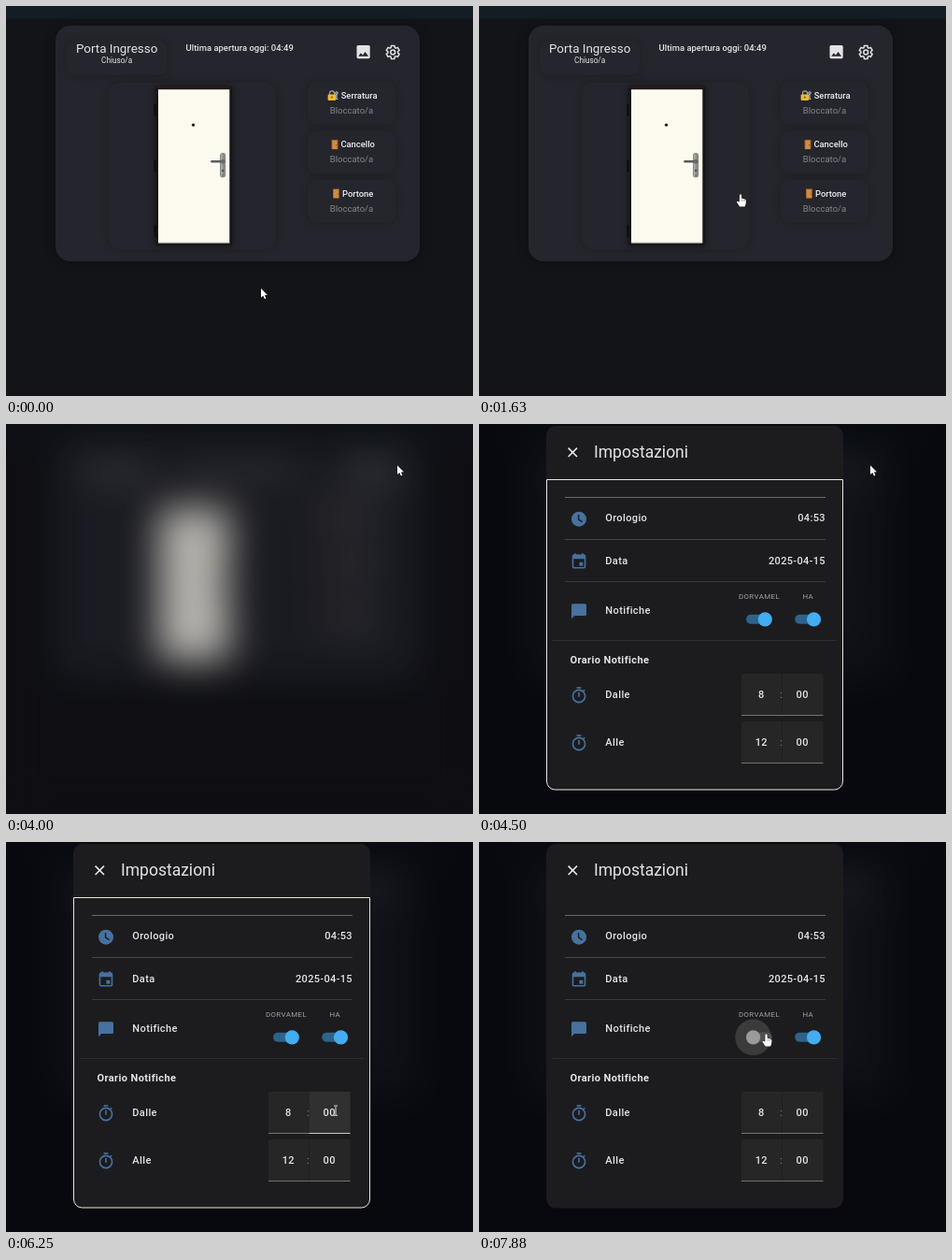
An HTML page with a canvas for the animation above (8 s loop, 500 px wide and 417 px high).

```html
<!DOCTYPE html>
<html lang="it">
<head>
<meta charset="utf-8">
<title>Porta Ingresso</title>
<style>
html, body { margin: 0; width: 100%; height: 100%; overflow: hidden; background: #131418; }
canvas { display: block; width: 500px; height: 417px; }
</style>
</head>
<body>
<canvas id="stage"></canvas>
<script>
const W = 500, H = 417, LOOP = 8000, STEP = 125, CLICK = 7500;
const dpr = window.devicePixelRatio || 1;
const FONT = 'Roboto, "Open Sans", sans-serif';
const BLUE = '#47719f';

function sized(canvas) {
  canvas.width = W * dpr;
  canvas.height = H * dpr;
  const c = canvas.getContext('2d');
  c.scale(dpr, dpr);
  return c;
}
const ctx = sized(document.getElementById('stage'));
const room = document.createElement('canvas');
let g = sized(room);

const clamp = v => Math.min(1, Math.max(0, v));
const ramp = (t, a, b) => clamp((t - a) / (b - a));
const ease = p => p * p * (3 - 2 * p);
const mix = (a, b, p) => a + (b - a) * p;

// ---- drawing helpers ----
function box(x, y, w, h, r, fill) {
  g.beginPath();
  g.roundRect(x, y, w, h, r);
  g.fillStyle = fill;
  g.fill();
}
function disc(x, y, r, fill) {
  g.beginPath();
  g.arc(x, y, r, 0, 7);
  g.fillStyle = fill;
  g.fill();
}
function ring(x, y, r, color, width) {
  g.beginPath();
  g.arc(x, y, r, 0, 7);
  g.strokeStyle = color;
  g.lineWidth = width;
  g.stroke();
}
function line(color, width, ...p) {
  g.beginPath();
  for (let i = 0; i < p.length; i += 2) g.lineTo(p[i], p[i + 1]);
  g.strokeStyle = color;
  g.lineWidth = width;
  g.stroke();
}
function poly(fill, ...p) {
  g.beginPath();
  for (let i = 0; i < p.length; i += 2) g.lineTo(p[i], p[i + 1]);
  g.closePath();
  g.fillStyle = fill;
  g.fill();
}
function text(s, x, y, size, { color = '#e4e4e6', weight = 400, align = 'center', space = 0 } = {}) {
  g.font = `${weight} ${size}px ${FONT}`;
  g.letterSpacing = space + 'px';
  g.textAlign = align;
  g.fillStyle = color;
  g.fillText(s, x, y);
}
function shadowBox(x, y, w, h, r, fill, shade, blur) {
  g.save();
  g.shadowColor = shade;
  g.shadowBlur = blur * dpr;
  box(x, y, w, h, r, fill);
  g.restore();
}

// ---- door panel ----
function drawDoor() {
  shadowBox(160, 86, 82, 170, 1, '#17171a', 'rgba(0,0,0,.55)', 6);
  box(161, 86, 79, 2, 0, '#2a1719');
  for (const y of [105, 165, 234]) box(158.5, y, 2.5, 13, 1, '#0d0d0f');
  box(163, 89.3, 76.3, 164, 0, '#fcf9ee');
  box(163, 252.5, 76.3, 1, 0, '#cfccc2');
  disc(200.5, 127.2, 1.6, '#1b1a18');
  box(229, 157, 6.2, 26.5, 3, '#8a8a89');
  box(230, 158, 1.6, 24, 1, '#a9a9a7');
  box(219.2, 165, 14, 2.5, 1.2, '#5d5d5c');
  disc(232.2, 166.3, 2.4, '#686867');
  disc(232.2, 176, 1.2, '#4a4a49');
  disc(232.2, 181, .8, '#5a5a59');
}
function drawImageIcon() {
  box(375.5, 42, 14.2, 14.2, 1.6, '#e3e3e6');
  poly('#25262d', 377.2, 53.8, 379.9, 50.3, 381.9, 52.6, 384.6, 49, 388.1, 53.8);
}
function drawGear() {
  g.beginPath();
  for (let k = 0; k < 6; k++) {
    const a = (k / 6 - .25) * Math.PI * 2;
    for (const [d, r] of [[-.4, 5.3], [-.25, 7.2], [.25, 7.2], [.4, 5.3]])
      g.lineTo(414.2 + r * Math.cos(a + d), 49.4 + r * Math.sin(a + d));
  }
  g.closePath();
  g.lineJoin = 'round';
  g.strokeStyle = '#e3e3e6';
  g.lineWidth = 1.5;
  g.stroke();
  g.lineJoin = 'miter';
  ring(414.2, 49.4, 2.4, '#e3e3e6', 1.5);
}
function drawLock() {
  g.beginPath();
  g.arc(349, 93.4, 2.5, Math.PI, 0);
  g.lineTo(351.5, 96);
  g.moveTo(346.5, 93.4);
  g.lineTo(346.5, 96);
  g.strokeStyle = '#a9a394';
  g.lineWidth = 1.2;
  g.stroke();
  box(344.6, 94.6, 8.6, 6.4, 1.2, '#f0b92f');
  disc(348.8, 97.4, 1, '#7a5a18');
  ring(353.9, 93, 1.3, '#c3cbd2', 1);
  line('#c3cbd2', 1.1, 353.9, 94, 353.9, 99.5, 355.4, 99.5);
}
function drawDoorIcon(x, y) {
  box(x, y, 6.8, 10.2, .6, '#a8652a');
  box(x + .9, y + .9, 5, 9, .3, '#d08c42');
  disc(x + 5, y + 5.6, .6, '#7a4a1c');
}
function drawPanel() {
  box(0, 0, W, H, 0, '#131418');
  box(0, 0, W, 13.5, 0, '#121e24');
  shadowBox(53, 21, 390, 252, 16, '#25262d', 'rgba(0,0,0,.35)', 12);
  const tile = (x, y, w, h, r) => shadowBox(x, y, w, h, r, '#25262d', 'rgba(0,0,0,.22)', 8);
  tile(65, 37, 107, 37, 9);
  tile(110, 82, 179, 178, 12);
  for (const y of [81, 133.4, 185.8]) tile(323, y, 94, 46, 10);

  text('Porta Ingresso', 118.6, 50, 13.4);
  text('Chiuso/a', 118.6, 61, 8.2);
  text('Ultima apertura oggi: 04:49', 250.2, 48.3, 9.45, { weight: 500 });
  drawImageIcon();
  drawGear();

  const label = { weight: 500, align: 'left', color: '#ededf0' };
  text('Serratura', 358.7, 99, 9.4, label);
  text('Cancello', 358.4, 151.4, 9.4, label);
  text('Portone', 360, 203.8, 9.4, label);
  for (const y of [115, 167.4, 219.8]) text('Bloccato/a', 370, y, 9.5, { color: '#85868c' });
  drawLock();
  drawDoorIcon(348.6, 143);
  drawDoorIcon(350, 195.4);
  drawDoor();
}

// ---- settings dialog ----
function drawClock(x, y) {
  disc(x, y, 8, BLUE);
  line('#1c1c1e', 1.4, x - .4, y - 4.6, x - .4, y + .5, x + 3.6, y + 2.9);
}
function drawCalendar(x, y) {
  g.strokeStyle = BLUE;
  g.lineWidth = 1.6;
  g.beginPath();
  g.roundRect(x - 6.5, y - 6.2, 13, 13.4, 1);
  g.stroke();
  box(x - 7, y - 6.8, 14, 4.4, 1, BLUE);
  box(x - 4.8, y - 8.4, 1.7, 3, 0, BLUE);
  box(x + 3.1, y - 8.4, 1.7, 3, 0, BLUE);
  box(x + .4, y + 1.2, 3.9, 3.9, 0, BLUE);
}
function drawMessage(x, y) {
  box(x - 8, y - 8, 16, 12.8, 1.6, BLUE);
  poly(BLUE, x - 8, y, x - 8, y + 8, x - 4, y + 4);
}
function drawTimer(x, y) {
  ring(x, y + 1, 6.6, BLUE, 1.6);
  box(x - 2.4, y - 8.8, 4.8, 1.6, 0, BLUE);
  box(x - .8, y - 3.2, 1.6, 5, 0, BLUE);
  line(BLUE, 1.6, x + 4.6, y - 4.2, x + 6.2, y - 5.8);
}
function drawSwitch(x, y, on, halo) {
  const shade = on > .5;
  box(x, y - 5, 27.5, 10, 5, shade ? '#2e638b' : '#49494b');
  const tx = mix(x + 7.6, x + 20.3, on);
  if (halo > 0) disc(tx, y, 19.3, shade ? `rgba(68,172,240,${.13 * halo})` : `rgba(160,160,160,${.23 * halo})`);
  if (!shade) box(tx, y - 5, x + 27.5 - tx, 10, 5, '#515153');
  disc(tx, y, 7.6, shade ? '#44acf0' : '#9b9b9b');
}
function drawTime(y, hour, cur) {
  const over = inside(cur, 281, y, 87, 44);
  box(281, y, 87.5, 44, [2, 2, 0, 0], '#262627');
  box(324, y, .8, 44, 0, '#1f1f20');
  line('#737375', 1, 281, y + 44.5, 368.5, y + 44.5);
  if (over) {
    const x = cur.x < 324 ? 281 : 324.5;
    box(x, y, 44, 44, 0, '#303031');
    line('#c9c9cb', 1, x, y + 44.5, x + 44, y + 44.5);
  }
  text(hour, 302.3, y + 26.4, 11, { weight: 500, space: .4 });
  text(':', 323.5, y + 26.4, 11, { color: '#8d8d8f' });
  text('00', 346.2, y + 26.4, 11, { weight: 500, space: .4 });
}
function drawDialog(t, cur) {
  box(72, 2, 318, 389.5, 10, '#1c1c1e');
  line('#eeeeee', 1.5, 95.6, 25.6, 105, 35);
  line('#eeeeee', 1.5, 105, 25.6, 95.6, 35);
  text('Impostazioni', 123, 36.4, 17.5, { align: 'left' });

  line('#68686a', 1, 92, 78.5, 371, 78.5);
  line('#454547', 1, 92, 123.5, 371, 123.5);
  line('#39393b', 1, 92, 168.5, 371, 168.5);
  line('#2e2e30', 1, 79, 231.5, 383, 231.5);

  const row = { weight: 500, align: 'left', space: .38 };
  text('Orologio', 135.3, 104, 11, row);
  text('Data', 135.3, 149.7, 11, row);
  text('Notifiche', 135.3, 203.4, 11, row);
  text('Orario Notifiche', 97.6, 256, 11, { ...row, weight: 600 });
  text('Dalle', 135.3, 293, 11, row);
  text('Alle', 135.3, 344, 11, row);
  text('04:53', 371, 104, 11, { ...row, align: 'right' });
  text('2025-04-15', 371, 149.7, 11, { ...row, align: 'right' });
  const tag = { color: '#a3a3a5', space: .4 };
  text('DORVAMEL', 300, 187, 7.9, tag);
  text('HA', 352.3, 187, 7.9, tag);

  drawClock(107, 101.7);
  drawCalendar(107, 146.6);
  drawMessage(107, 200.3);
  drawTimer(107, 290);
  drawTimer(107, 341);

  drawTime(267, '8', cur);
  drawTime(318, '12', cur);

  drawSwitch(338.2, 208.8, 1, 0);
  const halo = inside(cur, 280, 198, 40, 22) ? 1 : 0;
  drawSwitch(286, 208.8, 1 - ramp(t, CLICK, CLICK + 110), halo);

  if (t < CLICK) {
    g.beginPath();
    g.roundRect(72.5, 59.5, 317, 331.5, [0, 0, 9, 9]);
    g.strokeStyle = '#e8e6e0';
    g.lineWidth = 1;
    g.stroke();
  }
}

// ---- pointer ----
const path = [
  [0, 273, 302], [750, 274, 301], [1000, 274, 301], [1625, 280, 201.5],
  [2000, 280, 201.5], [3000, 399.5, 43.5], [3625, 419, 44.3], [4500, 419, 44.3],
  [5375, 340, 165], [6250, 353, 287], [7250, 307.5, 205.5], [LOOP, 307.5, 205.5]
];
function inside(p, x, y, w, h) {
  return p.x >= x && p.x < x + w && p.y >= y && p.y < y + h;
}
function pointerAt(t) {
  const i = path.findIndex(p => p[0] > t);
  const a = path[i - 1], b = path[i];
  const p = ease(ramp(t, a[0], b[0]));
  return { x: mix(a[1], b[1], p), y: mix(a[2], b[2], p) };
}
function drawArrow() {
  g.beginPath();
  for (const [x, y] of [[0, 0], [0, 9.8], [2.3, 7.8], [3.9, 11.2], [5.4, 10.5], [3.9, 7.2], [6.9, 7]]) g.lineTo(x, y);
  g.closePath();
  g.fillStyle = '#ffffff';
  g.strokeStyle = '#0a0a0a';
  g.lineWidth = .9;
  g.stroke();
  g.fill();
}
function drawHand() {
  g.beginPath();
  g.moveTo(-1.1, .4);
  g.quadraticCurveTo(0, -.8, 1.1, .4);
  g.lineTo(1.3, 4.2);
  g.quadraticCurveTo(5.8, 4.6, 6, 6.4);
  g.lineTo(5.6, 10.2);
  g.lineTo(4.6, 13);
  g.lineTo(-1, 13);
  g.lineTo(-4.1, 8.2);
  g.quadraticCurveTo(-3.6, 6.4, -1.2, 8.2);
  g.closePath();
  g.fillStyle = '#ffffff';
  g.strokeStyle = '#0a0a0a';
  g.lineWidth = 1;
  g.stroke();
  g.fill();
  for (const x of [1.4, 3.1, 4.6]) line('#555555', .5, x, 5, x, 7.2);
}
function drawBeam() {
  line('#d8d8d8', 1, 0, -4.5, 0, 5);
  line('#d8d8d8', .9, -2, -5, 2, -5);
  line('#d8d8d8', .9, -2, 5.4, 2, 5.4);
}
function drawPointer(t, p) {
  let draw = drawArrow;
  if (t < 3750) {
    if (inside(p, 53, 21, 390, 252)) draw = drawHand;
  } else if (inside(p, 281, 267, 87, 44) || inside(p, 281, 318, 87, 44)) draw = drawBeam;
  else if (inside(p, 280, 198, 87, 22)) draw = drawHand;
  g.save();
  g.translate(p.x, p.y);
  draw();
  g.restore();
}

// ---- frame ----
function render(t) {
  const cur = pointerAt(t);
  const blur = 20 * ramp(t, 3650, 3950);
  box(0, 0, W, H, 0, '#131418');
  g.save();
  if (blur) g.filter = `blur(${blur * dpr}px)`;
  g.drawImage(room, 0, 0, W, H);
  g.restore();

  const dim = .6 * ramp(t, 3730, 4300);
  if (dim) box(0, 0, W, H, 0, `rgba(1,3,9,${dim})`);

  const open = ramp(t, 4000, 4250);
  if (open) {
    const s = mix(.8, 1, ease(open));
    g.save();
    g.globalAlpha = open;
    g.translate(231, 197);
    g.scale(s, s);
    g.translate(-231, -197);
    drawDialog(t, cur);
    g.restore();
  }
  drawPointer(t, cur);
}

drawPanel();
g = ctx;
const start = performance.now();
let last = -1;
function tick() {
  const t = Math.floor((performance.now() - start) % LOOP / STEP) * STEP;
  if (t !== last) render(last = t);
  requestAnimationFrame(tick);
}
tick();
</script>
</body>
</html>
```
